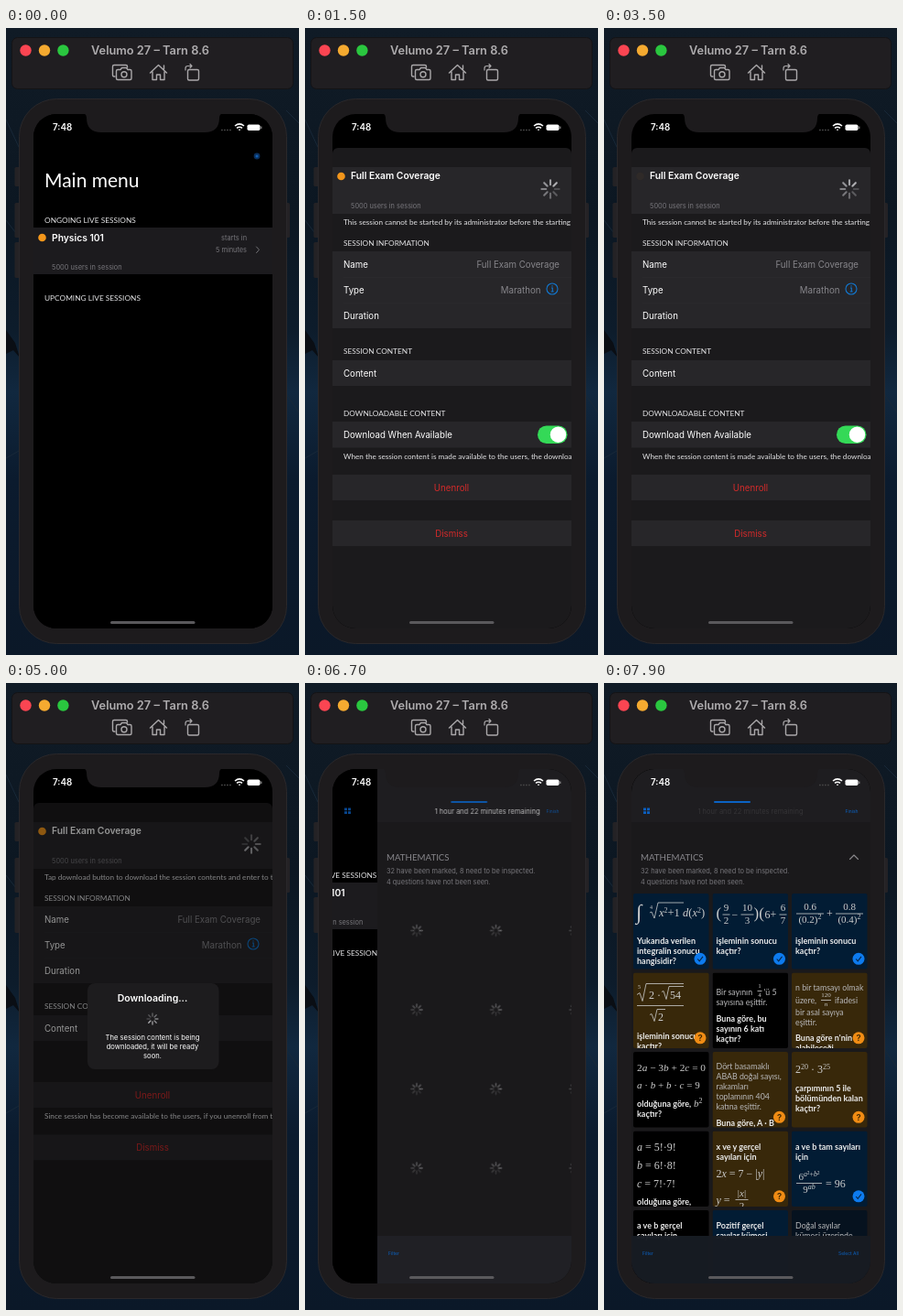
Write an HTML page that moves like this. It is 320x685 px and loops after 8000 ms.

```html
<!DOCTYPE html>
<html lang="en">
<head>
<meta charset="utf-8">
<title>Session download</title>
<style>
html, body { margin: 0; width: 100%; height: 100%; overflow: hidden; background: #0a1420; }
svg { display: block; width: 320px; height: 685px; }
text { font-family: Inter, sans-serif; fill: #fff; }
.lato { font-family: Lato, sans-serif; }
.head { font: 8.3px Lato, sans-serif; fill: #e4e4e6; }
.note { font: 8.2px Lato, sans-serif; fill: #e4e4e6; }
.title { font-size: 10.3px; font-weight: 600; }
.row { font-size: 9.7px; }
.grey { fill: #87868b; }
.dim { font-size: 7.4px; fill: #77767b; }
.red { fill: #d42a2a; text-anchor: middle; }
.end { text-anchor: end; }
.mid { text-anchor: middle; }
.link { font-size: 5px; fill: #0b63c4; }
.cell { fill: #272629; }
.line { fill: none; stroke: #aaa8aa; stroke-width: 1.4; stroke-linecap: round; stroke-linejoin: round; }
.math { font-family: "Liberation Serif", "Noto Serif", serif; fill: #ccc; }
.body { font: 8.8px Lato, sans-serif; fill: #b8b8ba; }
.bold { font: 700 9px Lato, sans-serif; fill: #ececec; }

.sheet, .back, .push, .under, .bar, .nav, .leave, .old, .new, .up1, .up2, .shade, .alert, .load, .wait, .remain {
  animation: 8s linear infinite;
}
.sheet { animation-name: sheet; }
.back { animation-name: back; transform-origin: 160.5px 94px; }
.push { animation-name: push; }
.under { animation-name: under; }
.bar { animation-name: bar; }
.nav { animation-name: nav; }
.leave { animation-name: leave; }
.old { animation-name: old; }
.new { animation-name: new; }
.up1 { animation-name: up1; }
.up2 { animation-name: up2; }
.shade { animation-name: shade; }
.alert { animation-name: shade, pop; transform-origin: 160.5px 375px; }
.load { animation-name: load; }
.wait { animation-name: wait; }
.remain { animation-name: remain; }
.blink { animation: blink 1.6667s ease-in-out infinite alternate; }
.late { animation-delay: -1.7333s; }
.spin { animation: spin 1s steps(8) infinite; }

@keyframes sheet {
  0%, 8.75% { transform: translateY(526px); animation-timing-function: cubic-bezier(.333,1,.667,1); }
  15%, 77.05% { transform: none; animation-timing-function: cubic-bezier(.333,1,.667,1); }
  82.05%, 100% { transform: translateY(526px); }
}
@keyframes back {
  0%, 8.75% { transform: translateY(0) scale(1); animation-timing-function: cubic-bezier(.333,1,.667,1); }
  15%, 77.05% { transform: translateY(30px) scale(.91); animation-timing-function: cubic-bezier(.333,1,.667,1); }
  82.05%, 100% { transform: translateY(0) scale(1); }
}
@keyframes push {
  0%, 81.625% { transform: translateX(261px); animation-timing-function: cubic-bezier(.333,1,.667,1); }
  86.625%, 100% { transform: translateX(0); }
}
@keyframes under {
  0%, 81.625% { transform: translateX(0); animation-timing-function: cubic-bezier(.333,1,.667,1); }
  86.625%, 100% { transform: translateX(-78px); }
}
@keyframes bar {
  0%, 81.625% { transform: translateX(209px); opacity: 0; animation-timing-function: cubic-bezier(.333,1,.667,1); }
  86.625%, 100% { transform: translateX(0); opacity: 1; }
}
@keyframes nav { 0%, 81.625% { opacity: 0; } 84.5%, 100% { opacity: 1; } }
@keyframes leave { 0%, 81.625% { opacity: 1; } 83.5%, 100% { opacity: 0; } }
@keyframes remain { 0%, 87.5% { opacity: .85; } 93.75%, 100% { opacity: .1; } }
@keyframes old { 0%, 51.25% { opacity: 1; } 53.75%, 100% { opacity: 0; } }
@keyframes new { 0%, 51.25% { opacity: 0; } 53.75%, 100% { opacity: 1; } }
@keyframes up1 { 0%, 51.25% { transform: translateY(0); } 54.5%, 100% { transform: translateY(-52px); } }
@keyframes up2 { 0%, 51.25% { transform: translateY(0); } 54.5%, 100% { transform: translateY(-44.5px); } }
@keyframes shade { 0%, 55% { opacity: 0; } 58%, 71.25% { opacity: 1; } 73.75%, 100% { opacity: 0; } }
@keyframes pop { 0%, 55% { transform: scale(1.15); animation-timing-function: ease-out; } 58%, 100% { transform: scale(1); } }
@keyframes load { 0%, 89% { opacity: 0; } 91.5%, 100% { opacity: 1; } }
@keyframes wait { 0%, 89% { opacity: 1; } 91.5%, 100% { opacity: 0; } }
@keyframes blink { from { opacity: 1; } to { opacity: 0; } }
@keyframes spin { to { transform: rotate(360deg); } }
</style>
</head>
<body>
<svg viewBox="0 0 320 685">
  <defs>
    <linearGradient id="sea" x2="0" y2="1">
      <stop offset="0" stop-color="#101b26"/>
      <stop offset=".3" stop-color="#0c1722"/>
      <stop offset=".48" stop-color="#0d1c2b"/>
      <stop offset=".58" stop-color="#11283f"/>
      <stop offset=".72" stop-color="#0b1b2e"/>
      <stop offset="1" stop-color="#0b1828"/>
    </linearGradient>
    <clipPath id="screen"><rect x="30" y="94" width="261" height="562" rx="25"/></clipPath>
    <clipPath id="tile"><rect width="82.5" height="82.5" rx="2"/></clipPath>
  </defs>

  <rect width="320" height="685" fill="url(#sea)"/>
  <path d="M0 330L10 344 15 360 8 352 0 356Z" fill="#0a0e14"/>
  <path d="M0 100L14 130M0 210L14 228M306 90L320 104M306 400L320 420M0 470L14 462" stroke="#182838" fill="none"/>

  <rect x="6.5" y="10.5" width="307" height="56" rx="6" fill="#201e21" stroke="#141315"/>
  <circle cx="21.500" cy="24.500" r="6.200" fill="#fb4552"/>
  <circle cx="42" cy="24.500" r="6.200" fill="#f5aa30"/>
  <circle cx="62.400" cy="24.500" r="6.200" fill="#2ac73f"/>
  <text x="93" y="28.500" font-size="12.800" font-weight="600" style="fill:#aeacae">Velumo 27 – Tarn 8.6</text>
  <g class="line">
    <path d="M119 53H118Q116.500 53 116.500 51V42Q116.500 40.500 118 40.500H131Q132.500 40.500 132.500 42V43"/>
    <path d="M122 45.500H125L126.500 43.500H131.500L133 45.500H135.500Q137 45.500 137 47V55Q137 56.500 135.500 56.500H122Q120.500 56.500 120.500 55V47Q120.500 45.500 122 45.500Z"/>
    <circle cx="129" cy="50.800" r="3"/>
    <path d="M157.500 49L166.500 40.500 175.500 49M160 48V56.500H164.500V51H168.500V56.500H173V48M172.500 45V41"/>
    <rect x="198.500" y="45.500" width="12" height="11.500" rx="1.500"/>
    <path d="M196 46V44Q196 41.500 198.500 41.500H203M201 39.500L203 41.500 201 43.500" stroke-width="1.200"/>
  </g>

  <g fill="#242225">
    <rect x="9.500" y="152" width="7" height="21" rx="1.500"/>
    <rect x="9.500" y="191" width="7" height="38" rx="1.500"/>
    <rect x="9.500" y="234" width="7" height="39" rx="1.500"/>
    <rect x="304" y="191" width="6" height="38" rx="1.500"/>
  </g>
  <rect x="14.500" y="77.500" width="292" height="595" rx="41" fill="#1d1b1d" stroke="#2a282b"/>

  <g clip-path="url(#screen)">
    <rect x="30" y="94" width="261" height="562"/>

    <g class="under"><g class="back">
      <rect x="30" y="94" width="261" height="562" rx="6"/>
      <g class="leave">
        <circle cx="274" cy="140" r="3.400" fill="#0b2f5c"/>
        <circle cx="274" cy="140" r="1.500" fill="#1260b4"/>
        <text class="lato" x="42" y="173.500" font-size="21">Main menu</text>
      </g>
      <text class="head" x="42" y="212.500">ONGOING LIVE SESSIONS</text>
      <rect x="30" y="218" width="261" height="51" fill="#1c1b1e"/>
      <circle class="blink" cx="39.500" cy="229" r="4.300" fill="#f5981c"/>
      <text class="title" x="50" y="232.800">Physics 101</text>
      <text class="dim end" x="263" y="231.500">starts in</text>
      <text class="dim end" x="263" y="244.700">5 minutes</text>
      <path class="line" d="M273.500 239L276.500 242.300 273.500 245.600" style="stroke:#747377;stroke-width:1"/>
      <text class="dim" x="50" y="263.700">5000 users in session</text>
      <text class="head" x="42" y="298">UPCOMING LIVE SESSIONS</text>
    </g></g>

    <g class="sheet">
      <rect x="30" y="131" width="261" height="560" rx="6" fill="#1b1a1c"/>
      <rect class="cell" x="30" y="152" width="261" height="51"/>
      <circle class="blink late" cx="39.500" cy="162" r="4.300" fill="#f5981c"/>
      <text class="title" x="50" y="165.300">Full Exam Coverage</text>
      <text class="dim" x="50" y="196.700">5000 users in session</text>
      <g data-spin="268 176 10.500"></g>
      <text class="note old" x="42" y="214.700">This session cannot be started by its administrator before the starting</text>
      <text class="note new" x="42" y="214.700">Tap download button to download the session contents and enter to the session</text>

      <text class="head" x="42" y="238.300">SESSION INFORMATION</text>
      <rect class="cell" x="30" y="244" width="261" height="84"/>
      <path d="M42 272.500H291M42 300.500H291" stroke="#2d2c2f" stroke-width=".6"/>
      <text class="row" x="42" y="262.300">Name</text>
      <text class="row grey end" x="278" y="262.300">Full Exam Coverage</text>
      <text class="row" x="42" y="290">Type</text>
      <text class="row grey end" x="257.500" y="290">Marathon</text>
      <g fill="none" stroke="#1277cf" stroke-width="1.100">
        <circle cx="270" cy="285" r="6"/>
        <path d="M269 284H270.300V288M268.700 288H271.700M270 281.300V282.500"/>
      </g>
      <text class="row" x="42" y="317.500">Duration</text>

      <text class="head" x="42" y="356.300">SESSION CONTENT</text>
      <rect class="cell" x="30" y="363" width="261" height="28"/>
      <text class="row" x="42" y="380.500">Content</text>

      <g class="old">
        <text class="head" x="42" y="424.300">DOWNLOADABLE CONTENT</text>
        <rect class="cell" x="30" y="430" width="261" height="28.500"/>
        <text class="row" x="42" y="447.500">Download When Available</text>
        <rect x="254" y="434.500" width="32.500" height="19.500" rx="9.750" fill="#34d957"/>
        <circle cx="276.500" cy="444.200" r="8.700" fill="#fff"/>
        <text class="note" x="42" y="470.700">When the session content is made available to the users, the download will start</text>
      </g>
      <text class="note new" x="42" y="476">Since session has become available to the users, if you unenroll from the session</text>
      <g class="up1">
        <rect class="cell" x="30" y="488" width="261" height="28"/>
        <text class="row red" x="160" y="505.500">Unenroll</text>
      </g>
      <g class="up2">
        <rect class="cell" x="30" y="538" width="261" height="28"/>
        <text class="row red" x="160" y="555.500">Dismiss</text>
      </g>
    </g>

    <rect class="shade" x="30" y="94" width="261" height="562" fill="#000" fill-opacity=".42"/>
    <g class="alert">
      <rect x="89" y="328" width="143.500" height="94" rx="8" fill="#1d1c1e"/>
      <text class="mid" x="160" y="347.500" font-size="10.500" font-weight="600">Downloading...</text>
      <g data-spin="160 367 6.500"></g>
      <g class="mid" font-size="7.600">
        <text x="160" y="390.300">The session content is being</text>
        <text x="160" y="400.300">downloaded, it will be ready</text>
        <text x="160" y="410.300">soon.</text>
      </g>
    </g>

    <g class="push">
      <rect x="30" y="94" width="261" height="562" fill="#1a191b"/>
      <rect x="30" y="94" width="261" height="58" fill="#1e1d20"/>
      <text class="lato grey" x="40" y="193.500" font-size="9.700">MATHEMATICS</text>
      <text class="dim grey" x="40" y="208">32 have been marked, 8 need to be inspected.</text>
      <text class="dim grey" x="40" y="219.500">4 questions have not been seen.</text>
      <path class="line" d="M268.500 192.500L273 188 277.500 192.500" style="stroke:#8a898c;stroke-width:1.100"/>
      <g class="wait" id="waits" opacity=".5"></g>
      <g class="load" id="tiles"></g>
      <rect x="30" y="604" width="261" height="52" fill="#212226" fill-opacity=".9"/>
      <rect class="load" x="30" y="604" width="261" height="52" fill="#141a22" fill-opacity=".75"/>
      <text class="link" x="42" y="625">Filter</text>
      <text class="link end" x="278" y="625">Select All</text>
    </g>
    <g class="bar">
      <rect x="120" y="129" width="40" height="2" rx="1" fill="#0b63c4"/>
      <text class="remain mid" x="160" y="142.500" font-size="7.500">1 hour and 22 minutes remaining</text>
    </g>
    <g class="nav">
      <path d="M43 136.500H46V139.300H43ZM47 136.500H50V139.300H47ZM43 140.300H46V143H43ZM47 140.300H50V143H47Z" fill="#0b5fc0"/>
      <text class="link end" x="277.500" y="141.500">Finish</text>
    </g>

    <rect x="114" y="648" width="92.500" height="3" rx="1.500" fill="#5a595c"/>
    <path d="M84 93Q88 94 88 98Q88 114 104 114H217Q233 114 233 98Q233 94 237 93Z" fill="#1d1b1d"/>
    <text x="51" y="112" font-size="9.800" font-weight="600">7:48</text>
    <path d="M235 111.500H246" stroke="#444" stroke-width="1.300" stroke-dasharray="1.800 1.200"/>
    <g fill="none" stroke="#fff" stroke-width="1.500">
      <path d="M250 107Q255 102.800 260 107M252 109.300Q255 107 258 109.300"/>
      <path d="M254.300 111.300H255.700"/>
    </g>
    <rect x="263.500" y="105.500" width="14" height="6.500" rx="1.800" fill="#fff"/>
    <path d="M278.800 107.500V110" stroke="#aaa"/>
  </g>
</svg>

<script>
const get = id => document.getElementById(id);

function spinner(x, y, r) {
  let spokes = "";
  for (let i = 0; i < 8; i++)
    spokes += `<path d="M0 ${-r * .45}V${-r * .92}" transform="rotate(${i * 45})" opacity="${.25 + .09 * ((i + 2) % 8)}"/>`;
  return `<g transform="translate(${x} ${y})"><g class="spin" stroke="#c4c4c8" stroke-width="${r * .2}" stroke-linecap="round">${spokes}</g></g>`;
}
document.querySelectorAll("[data-spin]").forEach(g => g.innerHTML = spinner(...g.dataset.spin.split(" ").map(Number)));

const lines = (cls, y, rows) => rows.map((s, i) => `<text class="${cls}" x="4" y="${y + i * 11}">${s}</text>`).join("");
const bold = (y, ...rows) => lines("bold", y, rows);
const body = (y, ...rows) => lines("body", y, rows);
const italic = s => s.replace(/[a-z]+/g, '<tspan font-style="italic">$&</tspan>');

// "x^2 + 1": the word after ^ is raised
const raised = s => s.split("^").map((part, i) => {
  if (!i) return italic(part);
  const [sup, ...rest] = part.split(" ");
  return `<tspan dy="-4" font-size="8">${italic(sup)}</tspan><tspan dy="4">${italic(rest.join(" "))}</tspan>`;
}).join("");
const math = (x, y, s, size = 12, cls = "") => `<text class="math ${cls}" x="${x}" y="${y}" font-size="${size}">${raised(s)}</text>`;
const stroke = d => `<path d="${d}" fill="none" stroke="#ccc" stroke-width=".8"/>`;
const frac = (x, y, w, top, low, size = 11) =>
  math(x + w / 2, y - 4, top, size, "mid") + stroke(`M${x} ${y}h${w}`) + math(x + w / 2, y + size * .95, low, size, "mid");

const blue = "#021c34", brown = "#38280a", black = "#000";
const tiles = [
  [blue, "✓", math(3, 28, "∫", 23) + math(18, 17, "4", 6) + stroke("M18 21l2-1 3 7 4-17h28") + math(28, 25, "x^2 +1", 12.5) + math(54, 25, "d(x^2 )", 12.5) +
    bold(55, "Yukarıda verilen", "integralin sonucu", "hangisidir?")],
  [blue, "✓", math(4, 27, "(", 17) + frac(11, 23, 8, "9", "2") + math(21, 27, "−") + frac(31, 23, 14, "10", "3") + math(45, 27, ")(", 17) +
    math(57, 27, "6+") + frac(73, 23, 8, "6", "7") + bold(55, "işleminin sonucu", "kaçtır?")],
  [blue, "✓", frac(5, 22, 30, "0.6", "(0.2)^2") + math(38, 26, "+") + frac(48, 22, 30, "0.8", "(0.4)^2") + bold(55, "işleminin sonucu", "kaçtır?")],
  [brown, "?", math(5, 17, "5", 6) + stroke("M4 24l3-2 3 9 4-19h41M31 21l2-1 3 9 3-14h16M4 36h51M18 46l2-1 3 8 3-13h9") +
    math(17, 28, "2 ·") + math(40, 28, "54") + math(27, 52, "2") + bold(72, "işleminin sonucu", "kaçtır?")],
  [black, "", body(24, "Bir sayının") + frac(49, 20, 5, "1", "4", 7) + `<text class="body" x="56" y="24">'ü 5</text>` + body(35, "sayısına eşittir.") +
    bold(53, "Buna göre, bu", "sayının 6 katı", "kaçtır?")],
  [brown, "?", body(19, "n bir tamsayı olmak") + body(33, "üzere,") + frac(32, 30, 11, "120", "n", 7) + `<text class="body" x="47" y="33">ifadesi</text>` +
    body(46, "bir asal sayıya", "eşittir.") + bold(74, "Buna göre n'nin", "alabileceği")],
  [black, "", math(4, 21, "2a − 3b + 2c = 0", 11.3) + math(4, 40, "a · b + b · c = 9", 11) + bold(60, "olduğuna göre,", "kaçtır?") + math(66, 60, "b^2", 11)],
  [brown, "?", body(19, "Dört basamaklı", "ABAB doğal sayısı,", "rakamları", "toplamının 404", "katına eşittir.") + bold(81, "Buna göre, A · B")],
  [brown, "?", math(4, 23, "2^20 &#160;· 3^25") + bold(43, "çarpımının 5 ile", "bölümünden kalan", "kaçtır?")],
  [black, "", math(4, 21, "a = 5!·9!") + math(4, 41, "b = 6!·8!") + math(4, 61, "c = 7!·7!") + bold(80, "olduğuna göre,")],
  [brown, "?", bold(20, "x ve y gerçel", "sayıları için") + math(4, 50, "2x = 7 − |y|") + math(4, 79, "y =") + frac(25, 75, 14, "|x|", "2")],
  [blue, "✓", bold(20, "a ve b tam sayıları", "için") + frac(5, 57, 28, "6^a²+b²", "9^ab") + math(37, 61, "= 96")],
  [black, "", bold(20, "a ve b gerçel", "sayıları için")],
  [blue, "", bold(20, "Pozitif gerçel", "sayılar kümesi")],
  ["#06121f", "", body(20, "Doğal sayılar", "kümesi üzerinde")]
];

const badge = sign => {
  if (!sign) return "";
  const mark = sign === "✓"
    ? '<path d="M70.200 71.500l2 2.300 3.800-5" fill="none" stroke="#06264a" stroke-width="1.100"/>'
    : '<text class="mid" x="73" y="74.700" font-size="9.500" font-weight="600" style="fill:#3a2400">?</text>';
  return `<circle cx="73" cy="71.300" r="6.500" fill="${sign === "✓" ? "#0d7bef" : "#f08c14"}"/>${mark}`;
};

tiles.forEach(([color, sign, content], i) => {
  const x = 32 + i % 3 * 86.5, y = 230 + Math.floor(i / 3) * 86.5;
  get("tiles").innerHTML += `<g transform="translate(${x} ${y})" clip-path="url(#tile)"><rect width="83" height="83" fill="${color}"/>${content}${badge(sign)}</g>`;
  if (i < 12) get("waits").innerHTML += `<g opacity=".55">${spinner(x + 41, y + 40.5, 6.5)}</g>`;
});
</script>
</body>
</html>
```
